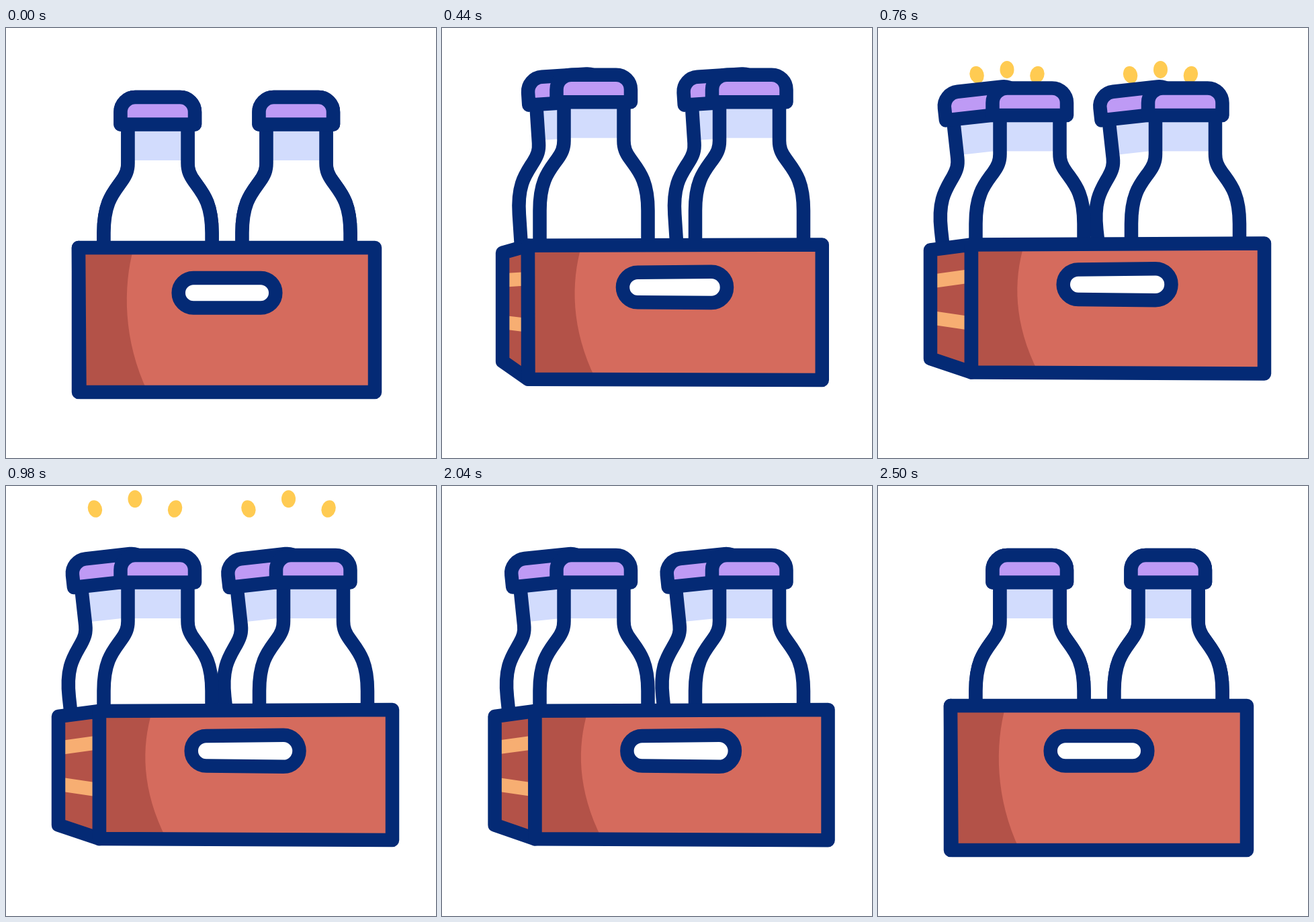
Recreate the animation shown at these times as an HTML page with a canvas. Size 640x640 px, loop 3.2 s.

```html
<!DOCTYPE html>
<html lang="en">
<head>
<meta charset="utf-8">
<title>Bottle crate</title>
<style>
html, body { margin: 0; height: 100%; overflow: hidden; background: #fff; }
canvas { display: block; width: 640px; height: 640px; }
</style>
</head>
<body>
<canvas id="stage" width="640" height="640"></canvas>
<script>
const ctx = document.getElementById('stage').getContext('2d');
const LOOP = 3200;
const INK = '#042a75', RED = '#d56b5d', DARK = '#b35248', STRIPE = '#f7ae72',
  CAP = '#be9af5', GLASS = '#d2dcfd', DROP = '#ffcb52', WHITE = '#fff';

const body = new Path2D('M181.5 143V201C181.5 212 178.5 219 172 228C160 245 145.5 259 145.5 305V380' +
  'H306.5V305C306.5 259 292 245 280 228C273.5 219 270.5 212 270.5 201V143');
const cap = new Path2D('M170.5 143.5V125a22 22 0 0 1 22-22H259a22 22 0 0 1 22 22V143.5Z');

const mix = (a, b, p) => a + (b - a) * p;
const span = (t, from, to) => Math.min(1, Math.max(0, (t - from) / (to - from)));
const smooth = u => (1 - Math.cos(Math.PI * u)) / 2;
const arch = (t, from, to) => Math.sin(Math.PI * span(t, from, to));

function paint(path, fill, stroke = INK) {
  if (fill) {
    ctx.fillStyle = fill;
    ctx.fill(path);
  }
  if (stroke) {
    ctx.strokeStyle = stroke;
    ctx.stroke(path);
  }
}

function polygon(...points) {
  const path = new Path2D();
  points.forEach(([x, y]) => path.lineTo(x, y));
  path.closePath();
  return path;
}

function bottle(dx, dy, angle = 0) {
  ctx.save();
  ctx.translate(170.5 + dx, 143.5 + dy);
  ctx.rotate(angle * Math.PI / 180);
  ctx.translate(-170.5, -143.5);
  paint(body, WHITE, null);
  ctx.fillStyle = GLASS;
  ctx.fillRect(181, 143, 90, 54);
  paint(body);
  paint(cap, CAP);
  ctx.restore();
}

function drops(dx, rise) {
  for (const side of [-1, 0, 1]) {
    const drop = new Path2D();
    const x = 192 + dx + side * (29 + 31 * rise);
    const y = 108 - (side ? 75 : 90) * rise;
    drop.ellipse(x, y, 10.5, 13, side * 0.3, 0, 7);
    paint(drop, DROP, null);
  }
}

function crate(p) {
  const left = mix(108, 139, p), leftLow = mix(109.5, 139, p), right = mix(549, 575, p);
  const top = mix(327, 335, p), low = mix(542, 525, p);
  const front = polygon([left, top], [right, mix(327, 333, p)], [right, mix(542, 527, p)], [leftLow, low]);

  // side panel with its two stripes
  const edge = mix(112, 78, p);
  const side = polygon([edge, 343], [left, top], [left, low], [edge, 504.5]);
  paint(side, DARK, null);
  paint(new Path2D(`M${edge} ${mix(373, 390, p)}L${left} 381.5M${edge} ${mix(451, 443.5, p)}L${left} ${mix(448, 452.5, p)}`),
    null, STRIPE);
  paint(side);

  // front panel with shadow
  const dx = 27.5 * p;
  paint(front, RED, null);
  paint(new Path2D(`M${left} ${top}H${190 + dx}C${174 + dx} ${mix(385, 388, p)} ${174 + dx} ${mix(465, 452, p)} ` +
    `${211 + dx} ${low}H${leftLow}Z`), DARK, null);
  paint(front);

  // handle
  const x1 = mix(279, 298, p), x2 = mix(379, 413, p);
  const r1 = 22.3, r2 = mix(22.3, 23.5, p), mid = 394.3;
  const handle = new Path2D();
  handle.arc(x1, mid, r1, Math.PI / 2, Math.PI * 1.5);
  handle.arc(x2, mid, r2, -Math.PI / 2, Math.PI / 2);
  handle.closePath();
  paint(handle, WHITE);
}

function draw(now) {
  const t = now % LOOP;
  const turn = smooth(span(t, 180, 620)) - smooth(span(t, 2000, 2490));
  const swing = span(t, 180, 620) - span(t, 2012, 2490);
  const gap = 206 + 25.5 * (smooth(span(t, 180, 420)) - smooth(span(t, 2165, 2500)));
  const hop = -36 * arch(t, 200, 840);
  const rise = arch(t, 662, 1240);

  ctx.fillStyle = WHITE;
  ctx.fillRect(0, 0, 640, 640);
  ctx.lineWidth = 20.5;
  ctx.lineJoin = 'round';

  if (rise > 0.001) [0, 228.5].forEach(dx => drops(dx, rise));
  for (const dx of [0, gap]) bottle(dx - 69.5 * swing, hop + 7.5 * swing, -6.3 * swing);
  for (const dx of [0, gap]) bottle(dx, hop);

  ctx.save();
  ctx.translate(0, -24 * arch(t, 390, 840));
  crate(turn);
  ctx.restore();
}

const start = performance.now();
function tick() {
  draw(performance.now() - start);
  requestAnimationFrame(tick);
}
tick();
</script>
</body>
</html>
```
